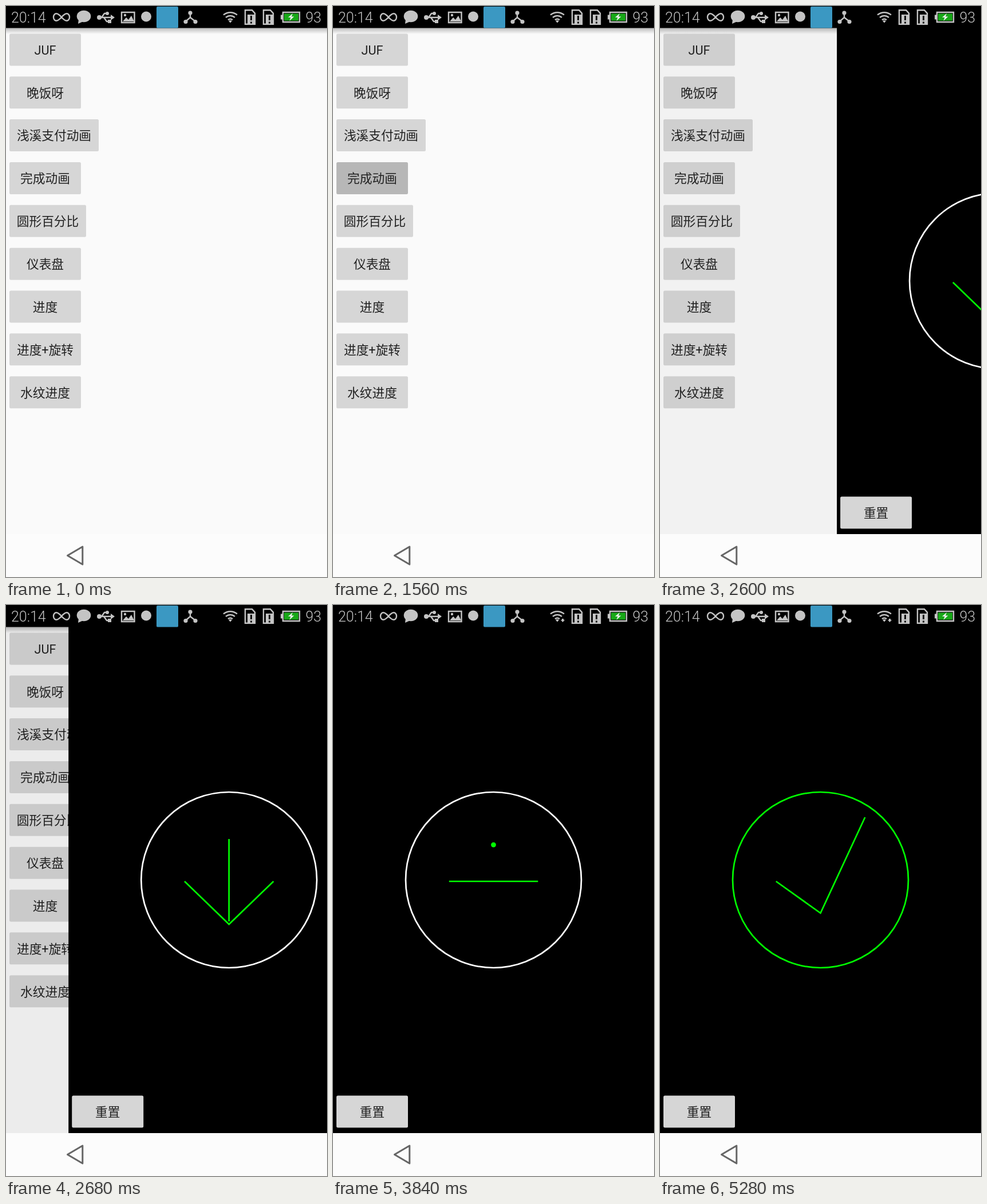
These frames come from a looping animation (561 by 998 pixels, 6520 ms). An HTML page:

```html
<!DOCTYPE html>
<html lang="zh-CN">
<head>
<meta charset="utf-8">
<title>Finish animation</title>
<style>
  html, body { margin: 0; width: 100%; height: 100%; overflow: hidden; background: #000; }
  svg { display: block; width: 100%; height: 100%; }
  text { font-family: Roboto, "Noto Sans CJK SC", "Noto Sans CJK", sans-serif; }
  .label { font-size: 21.7px; fill: #212121; text-anchor: middle; }
  .status { font-size: 25px; font-weight: 300; fill: #c4c4c4; }
  .solid { fill: #c4c4c4; }
  .line { fill: none; stroke: #c4c4c4; stroke-width: 2.4; }
  .green { fill: none; stroke: #0f0; stroke-width: 2.7; }
</style>
</head>
<body>
<svg viewBox="0 0 561 998">
  <defs>
    <linearGradient id="shade" x2="0" y2="1">
      <stop offset="0" stop-color="#000" stop-opacity=".26"/>
      <stop offset="1" stop-color="#000" stop-opacity="0"/>
    </linearGradient>
    <g id="sim">
      <path class="line" d="M418 7.200h12l5 5.500v19h-17z"/>
      <path class="solid" d="M422 15h13v17h-13z"/>
      <path d="M428.500 17v8m0 2.500v3" stroke="#000" stroke-width="2.800"/>
    </g>
  </defs>

  <rect width="561" height="998" fill="#fafafa"/>
  <g id="menu"></g>
  <rect y="38" width="561" height="11" fill="url(#shade)"/>
  <rect id="dim" y="38" width="561" height="885" opacity="0"/>

  <g id="page">
    <rect y="38" width="561" height="885"/>
    <circle id="ring" cx="280.5" cy="480.5" r="153.5" fill="none" stroke="#fff" stroke-width="2.7"/>
    <circle id="arc" class="green" r="153.5" pathLength="360"
            transform="translate(280.5 480.5) rotate(-90) scale(1 -1)"/>
    <path id="shaft" class="green"/>
    <path id="mark" class="green"/>
    <circle id="dot" cx="280.5" r="4.4" fill="#0f0"/>
    <g id="reset"></g>
  </g>

  <rect y="923" width="561" height="75" fill="#fcfcfc"/>
  <path d="M107.500 960.500L133.800 945v31z" fill="none" stroke="#666" stroke-width="3" stroke-linejoin="round"/>

  <rect width="561" height="38.500"/>
  <text class="status" x="9" y="29">20:14</text>
  <path class="line" d="M97 19.500c-4-4.500-6-6.300-9-6.300a5 6.300 0 0 0 0 12.600c3 0 5-1.800 9-6.300s6-6.300 9-6.300a5 6.300 0 0 1 0 12.600c-3 0-5-1.800-9-6.300z"/>
  <ellipse class="solid" cx="136" cy="18" rx="12.300" ry="10.300"/>
  <path class="solid" d="M127 23l-1 8 9-4z"/>
  <path class="line" d="M163 20h22M167 20l5-7h4M171 20l5 7h4"/>
  <circle class="solid" cx="163" cy="20" r="4"/>
  <circle class="solid" cx="177" cy="13" r="3"/>
  <path class="solid" d="M183 15l7 5-7 5zM178 24h6v6h-6z"/>
  <path class="line" d="M202 11h22.500v18H202z"/>
  <path class="solid" d="M204 27l6-7 4 4 5-7 5 10z"/>
  <circle class="solid" cx="208" cy="16" r="2.200"/>
  <circle class="solid" cx="245" cy="18.500" r="9"/>
  <rect x="263" y="1" width="38" height="37.500" rx="2" fill="#3b98c2"/>
  <path class="line" d="M322 12v8l-8 7m8-7l9 7"/>
  <g class="solid">
    <circle cx="322" cy="12" r="3.600"/>
    <circle cx="314" cy="27.500" r="3.600"/>
    <circle cx="331" cy="27.500" r="3.600"/>
  </g>
  <path class="line" d="M380 15.500q12-8.500 24 0M384 20q8-6 16 0M388 24.300q4-3 8 0"/>
  <path class="solid" d="M389 26q3-2 6 0l-3 3.500z"/>
  <path id="traffic" class="solid" d="M400 24h3v2h2l-3.500 4-3.500-4h2z"/>
  <use href="#sim"/>
  <use href="#sim" x="32"/>
  <path class="line" d="M484 11h29v17h-29z"/>
  <path class="solid" d="M480 15.500h4v8h-4z"/>
  <path d="M486 13.300h25v12.400h-25z" fill="#18a818"/>
  <path d="M501 13l-8 7h4.500l-2 6 8-7.500h-4.500z" fill="#eee"/>
  <text class="status" x="523.500" y="29">93</text>
</svg>

<script>
const LOOP = 6520, STEP = 40;
const $ = id => document.getElementById(id);
const clamp = v => Math.min(1, Math.max(0, v));
const span = (t, from, to) => clamp((t - from) / (to - from));
const mix = (a, b, p) => a + (b - a) * p;

function button(label, y, width = 125) {
  return `<rect x="6" y="${y}" width="${width}" height="56" rx="2.5" fill="#d6d6d6"/>` +
    `<text class="label" x="${6 + width / 2}" y="${y + 36.3}">${label}</text>`;
}

const labels = ["JUF", "晚饭呀", "浅溪支付动画", "完成动画", "圆形百分比",
  "仪表盘", "进度", "进度+旋转", "水纹进度"];
const wide = { 2: 156, 4: 134 };
$("menu").innerHTML = labels.map((s, i) => button(s, 48.4 + 74.85 * i, wide[i])).join("");
$("reset").innerHTML = button("重置", 857.6);
const pressed = $("menu").querySelectorAll("rect")[3];

function draw(t) {
  // Button press, then the page slides over the menu
  const press = t < 1560 ? 0 : 1 - span(t, 2200, 2480);
  const grey = Math.round(mix(214, 183, press));
  pressed.setAttribute("fill", `rgb(${grey},${grey},${grey})`);
  const slide = 1 - (1 - span(t, 2540, 2873)) ** 3;
  $("page").setAttribute("transform", `translate(${561 * (1 - slide)} 0)`);
  $("dim").setAttribute("opacity", 0.07 * slide);

  // Shaft shrinks to a dot, the head flattens, the dot rises
  const shrink = span(t, 2960, 3240);
  const flat = span(t, 3240, 3520);
  const rise = span(t, 3520, 4320);
  const half = 72 * (1 - shrink);
  $("shaft").setAttribute("d", `M280.5 ${481 - half}V${481 + half}`);
  $("dot").setAttribute("cy", mix(480.5, 327, rise));
  $("dot").setAttribute("visibility", shrink === 1 && rise < 1 ? "visible" : "hidden");

  // The ring turns green while the line bends into a tick
  const done = span(t, 4320, 5280);
  const tip = 483 + 75 * (1 - flat) + 55.5 * done;
  $("mark").setAttribute("d", `M202.800 483L280.500 ${tip}L358.300 ${483 - 112 * done}`);
  $("arc").setAttribute("stroke-dasharray", `${360 * done} 360`);
  $("arc").setAttribute("visibility", done > 0 ? "visible" : "hidden");
  $("ring").setAttribute("visibility", done < 1 ? "visible" : "hidden");
  $("traffic").setAttribute("visibility", t >= 3240 ? "visible" : "hidden");
}

const start = performance.now();
function tick() {
  const t = (performance.now() - start) % LOOP;
  draw(Math.floor(t / STEP) * STEP);
  requestAnimationFrame(tick);
}
tick();
</script>
</body>
</html>
```
